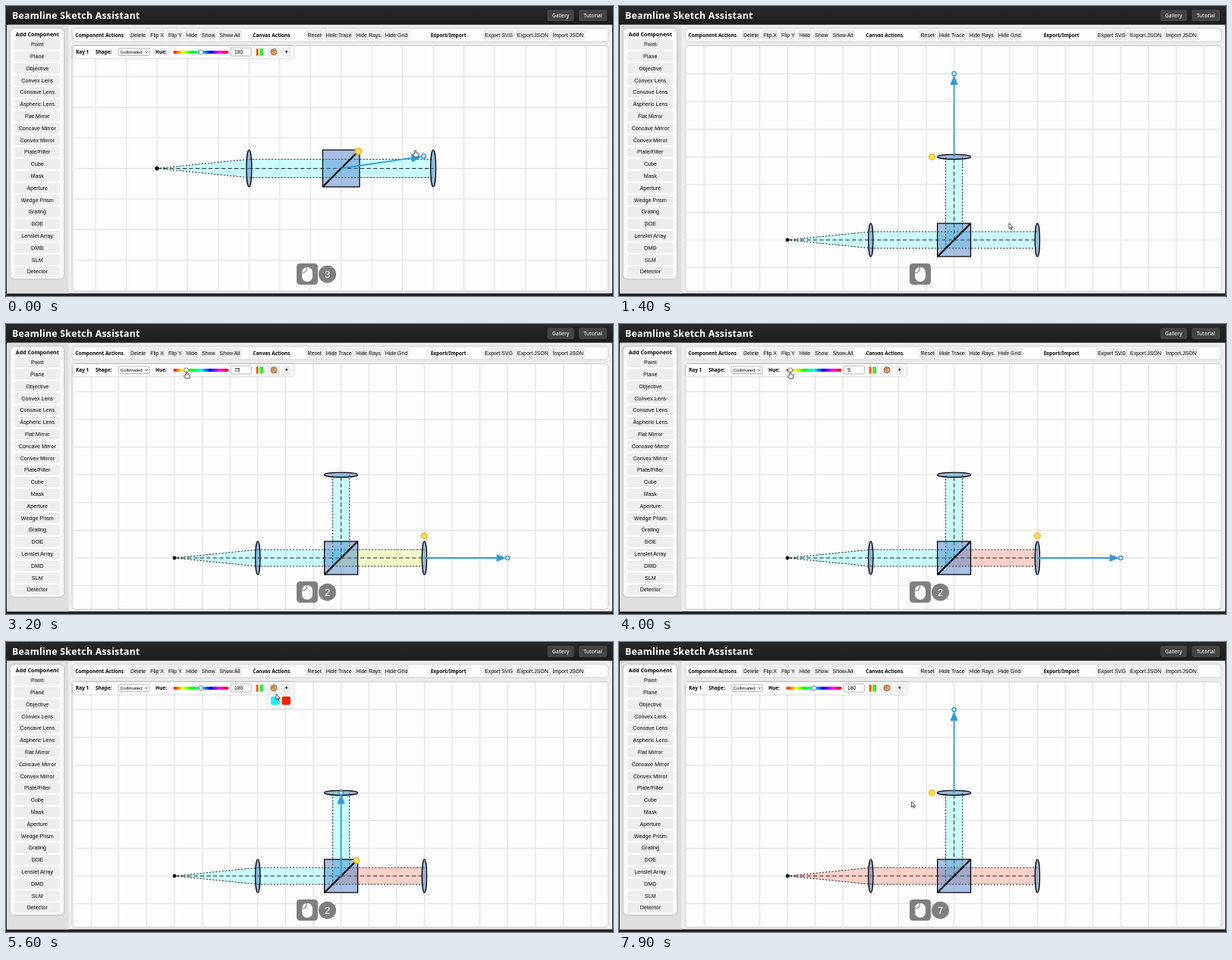
Recreate the animation shown at these times as an HTML page. Size 800x383 px, loop 8000 ms.

```html
<!DOCTYPE html>
<html lang="en">
<head>
<meta charset="utf-8">
<title>Beamline Sketch Assistant</title>
<style>
html, body { margin: 0; width: 100%; height: 100%; overflow: hidden; background: #202020; }
svg { display: block; width: 800px; height: 383px; font: 7px "Liberation Sans", Arial, sans-serif; }
.bold { font: bold 6.5px "Noto Sans", sans-serif; }
.mid { text-anchor: middle; }
.panel { fill: #fdfdfd; filter: drop-shadow(0 0 1.5px #0004); }
.btn { fill: #eee; stroke: #e2e2e2; stroke-width: .5; }
.nav { fill: #444; }
.nav + text { fill: #fff; font-family: "Noto Sans", sans-serif; }
.field { fill: #fff; stroke: #858585; stroke-width: .6; }
#scene * { vector-effect: non-scaling-stroke; }
.edge, .axis { fill: none; stroke: #111; stroke-width: .9; stroke-dasharray: 2.2 2; }
.axis { stroke-dasharray: 5 3.5; }
.optic { fill: rgba(52, 110, 190, .43); stroke: #000; stroke-width: 1.25; }
</style>
</head>
<body>
<svg viewBox="0 0 800 383">
  <defs>
    <linearGradient id="bar" x2="0" y2="1"><stop stop-color="#292929"/><stop offset="1" stop-color="#1c1c1c"/></linearGradient>
    <linearGradient id="hues"></linearGradient>
    <clipPath id="stage"><rect x="88" y="53" width="705" height="323" rx="4"/></clipPath>
  </defs>
  <rect width="800" height="383" fill="#202020"/>
  <rect x="1" y="24.5" width="798" height="355" fill="#efefef"/>
  <rect x="1" y="24.5" width="81.5" height="355" fill="#dfdfdf"/>
  <rect width="800" height="24.5" fill="url(#bar)"/>
  <text x="8" y="17.3" fill="#fff" style="font:bold 12.3px 'Noto Sans',sans-serif;letter-spacing:.25px">Beamline Sketch Assistant</text>
  <rect class="panel" x="6" y="30" width="70" height="330" rx="5"/>
  <rect class="panel" x="88" y="30" width="705" height="16.5" rx="4"/>
  <g class="bold">
    <text class="mid" x="41.3" y="40.2" style="font-size:7.1px">Add Component</text>
    <text x="91.3" y="40.5">Component Actions</text>
    <text x="325.3" y="40.5">Canvas Actions</text>
    <text x="559.7" y="40.5">Export/Import</text>
  </g>
  <g id="ui"></g>
  <rect class="panel" x="88" y="53" width="705" height="323" rx="4"/>
  <g clip-path="url(#stage)">
    <path id="grid" stroke="#dedede" fill="none"/>
    <g id="scene">
      <g id="beams"></g>
      <circle r=".065"/>
      <rect class="optic" x="5.4" y="-.6" width="1.2" height="1.2"/>
      <path d="M5.4 .6 6.6 -.6" stroke="#000" stroke-width="2.2"/>
      <ellipse class="optic" cx="3" rx=".085" ry=".6"/>
      <ellipse class="optic" cx="9" rx=".085" ry=".6"/>
      <ellipse class="optic" id="topLens" cx="6" cy="-3" rx=".6" ry=".085"/>
      <circle id="knob" r=".105" fill="#ffdc55" stroke="#f3b211" stroke-width="1.2"/>
      <g id="arrow">
        <path id="shaft" stroke="#3498db" stroke-width="1.8"/>
        <g id="head">
          <path d="M-.05 0-.4-.14V.14Z" fill="#3498db"/>
          <circle r=".07" fill="#fff" stroke="#3498db" stroke-width="1.5"/>
        </g>
      </g>
    </g>
  </g>
  <g id="rayBar">
    <path class="panel" d="M88 53H379V65.5Q379 69 375.5 69H88Z"/>
    <g class="bold"><text x="92" y="63">Ray 1</text><text x="118" y="63">Shape:</text><text x="197" y="63">Hue:</text></g>
    <rect class="field" x="148" y="56" width="41" height="9.5" rx="1.5"/>
    <text x="150.5" y="63" font-size="6.2">Collimated</text>
    <path d="M183.5 60l1.5 1.7 1.5-1.7" fill="none" stroke="#222" stroke-width=".9"/>
    <rect x="220.5" y="59" width="73" height="4" rx="2" fill="url(#hues)"/>
    <circle id="thumb" cy="61" r="3.1" fill="#f4f4f4" stroke="#666" stroke-width=".8"/>
    <rect class="field" x="296.3" y="55.3" width="27" height="10.7" rx="1"/>
    <text id="hueText" x="301" y="63.2" font-size="6.8"></text>
    <rect class="btn" x="328" y="55" width="13" height="11.5" rx="2"/>
    <path d="M331.2 56.5v9" stroke="#f03a24" stroke-width="2.4"/>
    <path d="M333.5 56.5v9" stroke="#ffe838" stroke-width="2.2"/>
    <path d="M336.8 56.5v9" stroke="#35e653" stroke-width="4.4"/>
    <rect class="btn" x="345.5" y="55" width="15" height="11.5" rx="2"/>
    <circle cx="353" cy="60.7" r="4" fill="#d5a05f" stroke="#765034" stroke-width=".7"/>
    <circle cx="351" cy="60" r=".8" fill="#37a"/>
    <circle cx="353" cy="58.5" r=".8" fill="#d33"/>
    <circle cx="355" cy="60.5" r=".8" fill="#eddb4d"/>
    <rect class="btn" x="364" y="55" width="11.5" height="11.5" rx="2"/>
    <text class="mid" x="369.7" y="63" font-weight="bold">+</text>
  </g>
  <g id="swatches">
    <rect class="panel" x="345" y="69" width="34" height="18" rx="3"/>
    <rect x="349" y="72" width="11.5" height="11" rx="2" fill="#25edf8"/>
    <rect x="363.5" y="72" width="11.5" height="11" rx="2" fill="#ef2400"/>
  </g>
  <g fill="#7f7f7f">
    <rect x="383" y="340" width="28" height="28" rx="4.5"/>
    <rect x="390" y="345" width="14" height="19" rx="6.5" fill="#fff"/>
    <path d="M390 352.5Q396.5 352.5 396.5 345" fill="none" stroke="#7f7f7f" stroke-width="1.1"/>
    <g id="badge"><circle cx="423.5" cy="354.2" r="11.5"/><text id="count" class="mid" x="423.5" y="358.8" fill="#fff" font-size="13"></text></g>
  </g>
  <g id="cursor" fill="#fff" stroke="#222" stroke-width=".8" stroke-linejoin="round">
    <path id="pointer" d="M0 0V7.2L1.7 5.7 2.9 8.3 4 7.8 2.9 5.3H5.2Z"/>
    <path id="hand" d="M-.8 .5Q0-.5 .8 .5V3.2L4 4Q4.7 4.5 4.3 6L3.5 9H-1L-3.3 5.5Q-3 4-.8 5Z"/>
  </g>
</svg>
<script>
const $ = id => document.getElementById(id);
const set = (id, attrs) => { for (const k in attrs) $(id).setAttribute(k, attrs[k]); };
const show = (id, on) => { $(id).style.display = on ? "" : "none"; };
const mix = (a, b, f) => a + (b - a) * f;
const ramp = (t, from, to) => Math.min(1, Math.max(0, (t - from) / (to - from)));
const ease = (t, from, to) => { const f = ramp(t, from, to); return f * f * (3 - 2 * f); };

const pen = document.createElement("canvas").getContext("2d");
pen.font = '7px "Liberation Sans", Arial, sans-serif';

function button(x, y, w, h, label, size = 7, kind = "btn") {
  return `<rect class="${kind}" x="${x}" y="${y}" width="${w}" height="${h}" rx="2.5"/>
    <text class="mid" x="${x + w / 2}" y="${y + h / 2 + size * .35}" font-size="${size}">${label}</text>`;
}

// A row of buttons, each as wide as its label.
function row(x, labels) {
  return labels.split(",").map(label => {
    const w = pen.measureText(label).width + 4, html = button(x, 31.7, w, 13, label);
    x += w + 1.9;
    return html;
  }).join("");
}

const parts = "Point,Plane,Objective,Convex Lens,Concave Lens,Aspheric Lens,Flat Mirror,Concave Mirror,Convex Mirror,Plate/Filter,Cube,Mask,Aperture,Wedge Prism,Grating,DOE,Lenslet Array,DMD,SLM,Detector";
$("ui").innerHTML =
  parts.split(",").map((p, i) => button(11.5, 44.5 + 15.8 * i, 59.5, 12.5, p, 7.2)).join("") +
  row(162, "Delete,Flip X,Flip Y,Hide,Show,Show All") +
  row(395.5, "Reset,Hide Trace,Hide Rays,Hide Grid") +
  row(629, "Export SVG,Export JSON,Import JSON") +
  button(713.5, 5, 35, 15, "Gallery", 6.8, "nav") + button(755, 5, 37, 15, "Tutorial", 6.8, "nav");
$("hues").innerHTML = Array.from({ length: 13 }, (_, i) =>
  `<stop offset="${i / 12}" stop-color="hsl(${i * 30},100%,50%)"/>`).join("");

// Each beam leaves one optic and has two edges, a-b and c-d.
function beam(optic, a, b, c, d) {
  const mid = (p, q) => [(p[0] + q[0]) / 2, (p[1] + q[1]) / 2];
  return `<g id="${optic}Beam"><path d="M${[a, b, d, c].join(" ")}Z"/>
    <path class="edge" d="M${a} ${b}M${c} ${d}"/><path class="axis" d="M${mid(a, c)} ${mid(b, d)}"/></g>`;
}
$("beams").innerHTML =
  beam("point", [0, 0], [3, -.3], [0, 0], [3, .3]) +
  beam("lens1", [3, -.3], [6.3, -.3], [3, .3], [5.7, .3]) +
  beam("lens2", [6.3, -.3], [9, -.3], [5.7, .3], [9, .3]) +
  beam("cube", [5.7, .3], [5.7, -3], [6.3, -.3], [6.3, -3]);

// Positions in grid cells; knob is the offset of the rotation grip.
const optics = {
  point: { x: 0, y: 0, turn: 0, knob: [0, -.5] },
  lens1: { x: 3, y: 0, turn: 0, knob: [0, -.8] },
  cube: { x: 6, y: 0, turn: -90, knob: [.56, -.56] },
  lens2: { x: 9, y: 0, turn: 0, knob: [0, -.8] },
  lens3: { x: 6, y: -3, turn: -90, knob: [-.8, 0] }
};
const picks = { aim: "cube", menu: "lens3" };
const CYAN = 180, RED = 9, PAUSE = 600, GLIDE = 300;

// Every press of the mouse: time, spot and, for drags, release.
const presses = [
  [0, "aim", 250], [400, "menu"], [1050, "pan", 1300], [1950, "lens2"], [2350, "thumb", 3730],
  [4700, "cube"], [5300, "palette"], [5900, "lens1"], [6400, "swatch"], [6900, "point"],
  [7250, "swatch"], [7600, "lens3"], [8000, "rest"]
].map(([at, spot, until = at]) => ({ at, spot, until }));

const drag = (t, spot) => { const p = presses.find(q => q.spot === spot); return [t, p.at, p.until]; };
const hueAt = t => Math.round(mix(CYAN, RED, ramp(...drag(t, "thumb"))));
const thumbX = hue => 224 + 66 * hue / 360;

function viewAt(t) {
  const zoom = ease(t, 900, 1000), pan = ease(...drag(t, "pan"));
  return { x: mix(199, 222, zoom), y: mix(214.5, 309, pan), s: mix(40.45, 36.6, zoom) };
}

function aimAt(t) {
  const f = ease(...drag(t, "aim"));
  return { turn: mix(-8.4, -90, f), length: mix(2.72, 3, f) };
}

function spotAt(name, t) {
  const v = viewAt(t);
  if (name in optics) return [v.x + optics[name].x * v.s, v.y + optics[name].y * v.s];
  if (name === "aim") {
    const { turn, length } = aimAt(t), a = turn * Math.PI / 180;
    return [v.x + (6 + length * Math.cos(a)) * v.s - 11, v.y + length * Math.sin(a) * v.s - 8];
  }
  if (name === "pan") return [514, v.y - 22];
  if (name === "thumb") return [thumbX(hueAt(t)), 63];
  return { menu: [41, 98], palette: [356, 69], swatch: [366.5, 70], rest: [366, 215] }[name];
}

// Replays the presses up to t to find what is selected, recoloured and counted.
function stateAt(t) {
  const s = { count: 2, hues: { point: CYAN, lens1: CYAN, cube: CYAN, lens2: hueAt(t) } };
  let last = presses[0];
  for (const p of presses.filter(q => q.at <= t)) {
    s.count = p.at - last.until > PAUSE ? 1 : s.count + 1;
    if (p.spot in optics || p.spot in picks) s.chosen = picks[p.spot] || p.spot;
    if (p.spot === "swatch") s.hues[s.chosen] = RED;
    last = p;
  }
  if (t - last.until > PAUSE) s.count = 1;
  return { ...s, last, next: presses[presses.indexOf(last) + 1] };
}

function drawGrid({ x, y, s }) {
  let d = "";
  for (let gx = x % s; gx < 800; gx += s) d += `M${gx} 53V376`;
  for (let gy = y % s; gy < 383; gy += s) d += `M88 ${gy}H793`;
  set("grid", { d });
}

function drawCursor(t, last, next) {
  const leave = Math.max(last.until, next.at - GLIDE);
  const f = ease(t, leave, next.at), a = spotAt(last.spot, t), b = spotAt(next.spot, t);
  const hand = t <= leave && ["aim", "thumb"].includes(last.spot);
  set("cursor", { transform: `translate(${mix(a[0], b[0], f)} ${mix(a[1], b[1], f)})` });
  show("hand", hand);
  show("pointer", !hand);
}

function render(t) {
  const view = viewAt(t), { chosen, count, hues, last, next } = stateAt(t);
  drawGrid(view);
  set("scene", { transform: `translate(${view.x} ${view.y}) scale(${view.s})` });

  const { x, y, turn, knob } = optics[chosen];
  const arrow = last.spot === "aim" ? aimAt(t) : { turn, length: 3 };
  set("knob", { cx: x + knob[0], cy: y + knob[1] });
  set("arrow", { transform: `translate(${x} ${y}) rotate(${arrow.turn})` });
  set("shaft", { d: `M0 0H${arrow.length - .3}` });
  set("head", { transform: `translate(${arrow.length})` });
  for (const id of ["topLens", "cubeBeam"]) show(id, last.spot !== "aim");
  for (const id in hues) set(id + "Beam", { fill: `hsla(${hues[id]},100%,50%,.2)` });

  const hue = chosen === "lens2" ? hues.lens2 : CYAN;
  show("rayBar", !["menu", "pan"].includes(last.spot));
  set("thumb", { cx: thumbX(hue) });
  $("hueText").textContent = hue;
  show("swatches", last.spot === "palette" || next.spot === "swatch");

  show("badge", count > 1);
  $("count").textContent = count;
  drawCursor(t, last, next);
}

const start = performance.now();
function tick() {
  const t = (performance.now() - start) % 8000;
  render(Math.floor(t / 100) * 100);
  requestAnimationFrame(tick);
}
tick();
</script>
</body>
</html>
```
